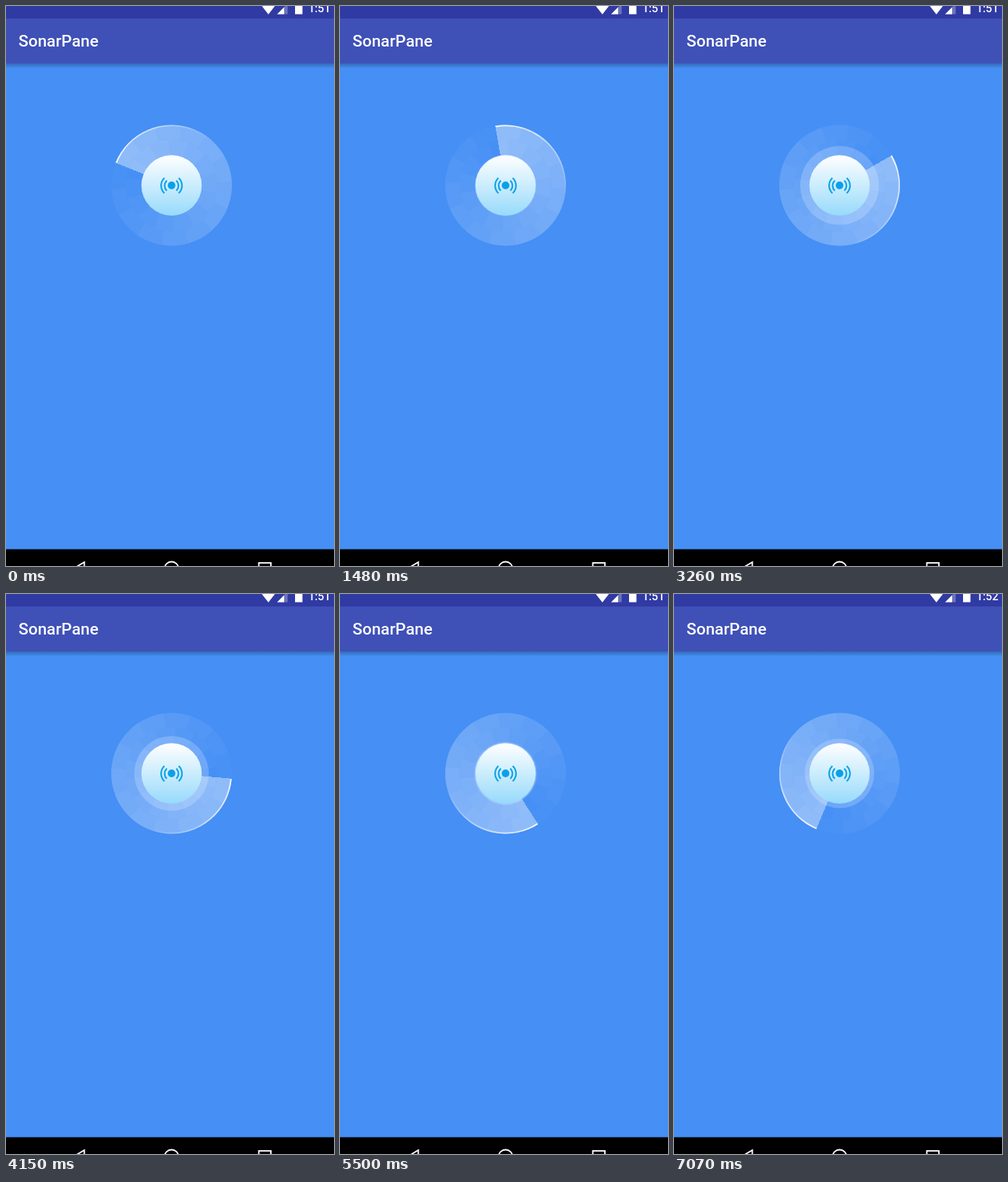
Recreate the animation shown at these times as an HTML page with a canvas. Size 421 px wide and 718 px high, loop 7170 ms.

```html
<!DOCTYPE html>
<html lang="en">
<head>
<meta charset="utf-8">
<title>SonarPane</title>
<style>
  html, body { margin: 0; width: 100%; height: 100%; overflow: hidden; background: #458ff5; }
  #stage { position: relative; width: 421px; height: 718px; overflow: hidden; }
  canvas { display: block; }
  .label { position: absolute; color: #fff; white-space: nowrap; font-family: Roboto, sans-serif; font-weight: 500; }
  #title { left: 16px; top: 33px; font-size: 21px; line-height: 24px; }
  #clock { left: 388px; top: -4px; font-size: 14.5px; line-height: 16px; }
</style>
</head>
<body>
<div id="stage">
  <canvas id="view" width="421" height="718"></canvas>
  <div class="label" id="title">SonarPane</div>
  <div class="label" id="clock">1:51</div>
</div>
<script>
const ctx = document.getElementById('view').getContext('2d');
const clock = document.getElementById('clock');
const W = 421, H = 718, LOOP = 7170, TAU = Math.PI * 2;
const CX = 212.5, CY = 230, RADIUS = 77.5, CORE = 38.7;

// Runs of evenly spaced steps: first time, last time, count
const RUNS = [
  [150, 1180, 8], [1330, 2370, 8], [2510, 3550, 8], [3700, 4600, 7],
  [4750, 5650, 7], [5800, 6830, 8], [7070, 7070, 1]
];

const rad = deg => deg * Math.PI / 180;
const white = a => `rgba(255,255,255,${a})`;

function heldStep(t) {
  let index = 0, time = 0;
  for (const [first, last, count] of RUNS) {
    if (t < first) break;
    const gap = count > 1 ? (last - first) / (count - 1) : 1;
    const k = Math.min(count - 1, Math.floor((t - first + 4) / gap));
    index += k + 1;
    time = first + k * gap;
  }
  return { index, time };
}

function rect(x, y, w, h, fill) {
  ctx.fillStyle = fill;
  ctx.fillRect(x, y, w, h);
}

function disc(r, fill) {
  ctx.beginPath();
  ctx.arc(CX, CY, r, 0, TAU);
  ctx.fillStyle = fill;
  ctx.fill();
}

function poly(points, fill) {
  ctx.beginPath();
  points.forEach(([x, y]) => ctx.lineTo(x, y));
  ctx.closePath();
  ctx.fillStyle = fill;
  ctx.fill();
}

function arcLine(x, y, r, from, to) {
  ctx.beginPath();
  ctx.arc(x, y, r, from, to);
  ctx.stroke();
}

function drawBars() {
  rect(0, 0, W, H, '#458ff5');
  const shadow = ctx.createLinearGradient(0, 73, 0, 80);
  shadow.addColorStop(0, 'rgba(0,0,0,0.28)');
  shadow.addColorStop(1, 'rgba(0,0,0,0)');
  rect(0, 73, W, 7, shadow);
  rect(0, 16, W, 57.5, '#3f50b7');
  rect(0, 0, W, 16, '#303aa3');
  rect(0, 696.5, W, 22, '#000');
}

function drawStatusIcons() {
  poly([[326, -3], [347.5, -3], [336.8, 10.8]], '#fff');
  poly([[348, 10.5], [361.5, 10.5], [361.5, -3]], white(0.3));
  poly([[348, 10.5], [357, 10.5], [357, 1.5]], '#fff');
  rect(371, -2, 9.5, 12.5, '#fff');
}

function drawNavIcons() {
  ctx.strokeStyle = '#fff';
  ctx.lineWidth = 1.8;
  ctx.beginPath();
  ctx.moveTo(100.5, 730);
  ctx.lineTo(100.5, 713);
  ctx.lineTo(88, 720.5);
  ctx.stroke();
  arcLine(CX, 721.5, 9, 0, TAU);
  ctx.strokeRect(324.5, 714, 15.5, 16);
}

// Fading sweep in flat tones, starting at the bright edge
function sweepFill(start, levels, shift) {
  const g = ctx.createConicGradient(start, CX, CY);
  for (let k = 0; k <= levels; k++) {
    const from = Math.max(0, (k - shift) / levels);
    const to = Math.min(1, (k + 1 - shift) / levels);
    const tone = white(0.41 * (1 - (from + to) / 2));
    g.addColorStop(from, tone);
    g.addColorStop(to, tone);
    if (to === 1) break;
  }
  return g;
}

function ringBand(inner, outer, fill) {
  ctx.beginPath();
  ctx.arc(CX, CY, outer, 0, TAU);
  if (inner) ctx.arc(CX, CY, inner, 0, TAU, true);
  ctx.fillStyle = fill;
  ctx.fill();
}

function drawSweep(start) {
  ringBand(59, RADIUS, sweepFill(start, 14, 0));
  ringBand(0, 59, sweepFill(start, 14, 0.5));

  const rim = ctx.createConicGradient(start, CX, CY);
  rim.addColorStop(0, white(0.9));
  rim.addColorStop(0.12, white(0.6));
  rim.addColorStop(0.3, white(0));
  rim.addColorStop(1, white(0));
  ctx.strokeStyle = rim;
  ctx.lineWidth = 1.8;
  arcLine(CX, CY, RADIUS - 0.9, start, start + TAU * 0.3);
}

function drawCore(time) {
  const phase = time / 497 % 1;
  const pulse = 1 - Math.abs(1 - 2 * phase);
  disc(CORE + 13 * pulse, white(0.2));

  const g = ctx.createLinearGradient(0, CY - CORE, 0, CY + CORE);
  g.addColorStop(0, '#ffffff');
  g.addColorStop(1, '#97dafb');
  disc(CORE, g);

  disc(4.9, '#0ba1e8');
  ctx.strokeStyle = '#0ba1e8';
  ctx.lineWidth = 2;
  for (const [r, half] of [[8.9, 47], [13.4, 47]]) {
    for (const side of [0, 180]) {
      arcLine(CX, CY + 0.3, r, rad(side - half), rad(side + half));
    }
  }
}

function draw(t) {
  const { index, time } = heldStep(t);
  drawBars();
  drawStatusIcons();
  drawNavIcons();
  drawSweep(rad(202 + Math.min(5.82 * index, 270.6)));
  drawCore(time);
  clock.textContent = time < 6380 ? '1:51' : '1:52';
}

const begin = performance.now();
function tick() {
  draw((performance.now() - begin) % LOOP);
  requestAnimationFrame(tick);
}
tick();
</script>
</body>
</html>
```
